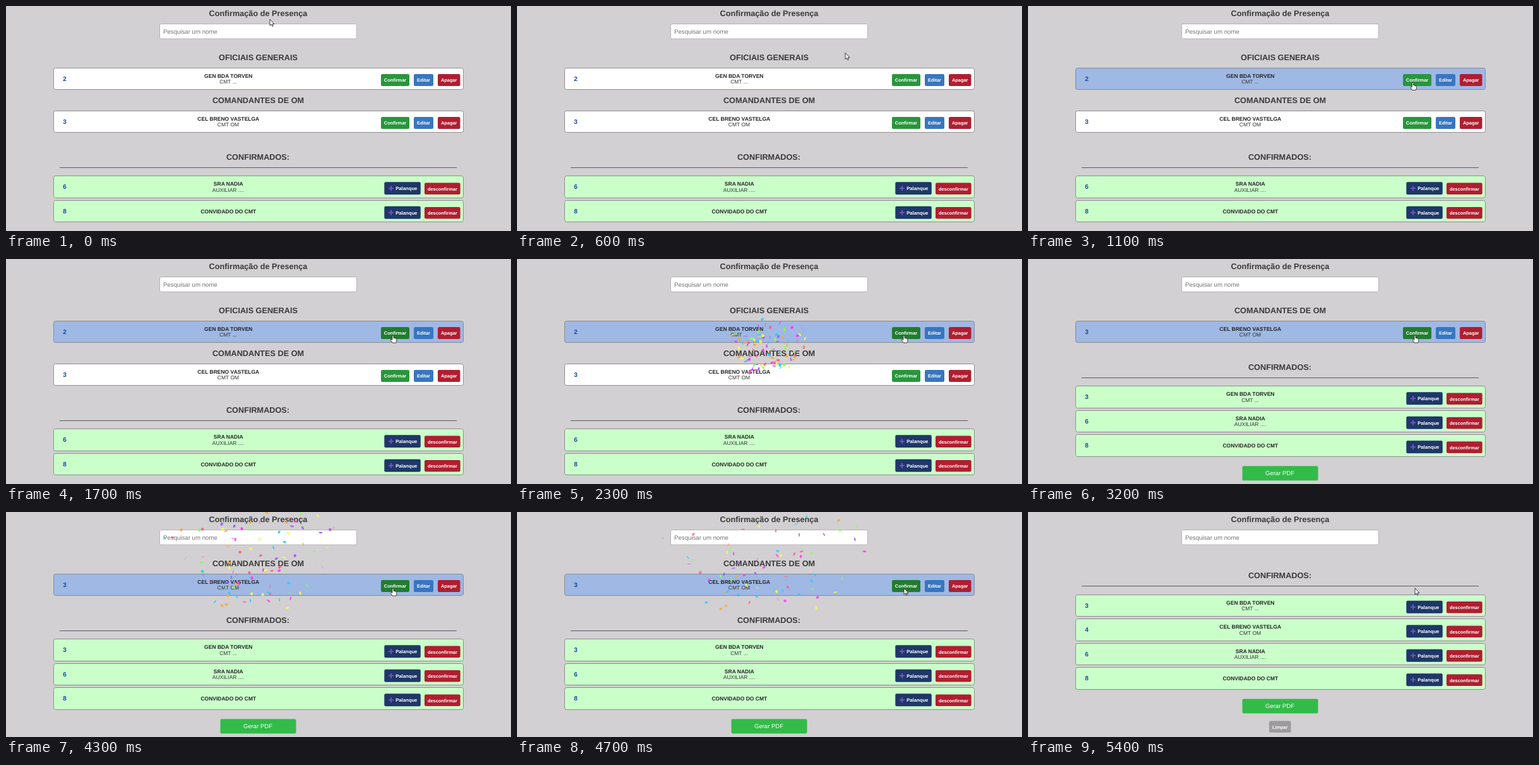
Write an HTML page with a canvas that moves like this. It is 800 px wide and 357 px high and loops after 5.5 s.

```html
<!DOCTYPE html>
<html lang="pt-BR">
<head>
<meta charset="utf-8">
<title>Confirmação de Presença</title>
<style>
  html, body { margin: 0; width: 100%; height: 100%; overflow: hidden; background: #d2d0d2; }
  svg, canvas { position: absolute; left: 0; top: 0; width: 800px; height: 357px; }
  text {
    font-family: "Liberation Sans", Arial, sans-serif;
    text-anchor: middle;
    text-rendering: geometricPrecision;
  }
</style>
</head>
<body>
<svg id="page" viewBox="0 0 800 357"></svg>
<canvas id="confetti" width="800" height="357"></canvas>
<svg viewBox="0 0 800 357">
  <g id="cursor" fill="#fff" stroke="#111" stroke-width=".8" stroke-linejoin="round">
    <path id="arrow" d="M0 0V10L2.3 8L3.8 11.3L5.4 10.6L3.9 7.5H7Z"/>
    <path id="hand" d="M-1.1 .8Q0 -.6 1.1 .8V4.4L4.3 5.1Q5.8 5.5 5.8 7V9Q5.8 10.5 4.8 12.2H-.8Q-2.4 10 -3.8 7.6Q-3.4 6 -1.1 7.4Z"/>
  </g>
</svg>
<script>
const LOOP = 5500;
const RELOADS = [2900, 4800];
const BURSTS = [{ start: 2240, end: 2900, seed: 11 }, { start: 4130, end: 4800, seed: 47 }];
const $ = id => document.getElementById(id);

const PEOPLE = {
  general: ['GEN BDA TORVEN', 'CMT ...'],
  colonel: ['CEL BRENO VASTELGA', 'CMT OM'],
  lady: ['SRA NADIA', 'AUXILIAR ....'],
  guest: ['CONVIDADO DO CMT', '']
};
const GREEN = [40, 150, 60], DARK_GREEN = [33, 124, 47];
const WHITE = [255, 255, 255], BLUE = [159, 184, 228];
const rgb = c => `rgb(${c.map(Math.round)})`;
const mix = (a, b, k) => rgb(a.map((v, i) => v + (b[i] - v) * k));
const clamp = v => Math.min(1, Math.max(0, v));
const snap = v => Math.floor(v) + .5;

// Static markup; y is the vertical middle of a line of text
const label = (s, x, y, size, fill, extra = '') =>
  `<text x="${x}" y="${y + size * .36}" font-size="${size}" fill="${fill}" ${extra}>${s}</text>`;
const bold = (s, x, y, size, fill) => label(s, x, y, size, fill, 'font-weight="700"');
const box = (x, y, w, h, fill, extra = '') =>
  `<rect x="${x}" y="${y}" width="${w}" height="${h}" rx="2.2" fill="${fill}" ${extra}/>`;
const button = (s, x, y, w, h, fill, extra) =>
  box(x, y, w, h, fill, extra) + bold(s, x + w / 2, y + h / 2 + .2, 7.42, '#fff');
const heading = (s, y) => bold(s, s.endsWith(':') ? 399 : 399.5, y, 12.7, '#3a3a3a');

function row(y, h, fill, num, [name, role], extra = '') {
  const top = snap(y);
  return `<rect x="75.5" y="${top}" width="649" height="${snap(y + h) - top}" rx="3" fill="${fill}" stroke="#858585" stroke-width=".9" ${extra}/>` +
    bold(num, 93, y + 17, 10, '#1648a0') +
    bold(name, 352.3, y + (role ? 12.7 : 17.5), 8.5, '#242424') +
    label(role, 352, y + 22.3, 8.5, '#333');
}

function pending(title, y, num, who, state) {
  const hover = state === 'hover', live = state === 'live';
  return heading(title, y) +
    row(y + 17, 34, rgb(hover ? BLUE : WHITE), num, who, live ? 'id="liveRow"' : '') +
    button('Confirmar', 594, y + 27, 45, 19, rgb(hover ? DARK_GREEN : GREEN), live ? 'id="liveButton"' : '') +
    button('Editar', 646, y + 27, 31, 19, '#3876bf') +
    button('Apagar', 684, y + 27, 35.5, 19, '#b01e30');
}

function confirmed(y, num, who) {
  return row(y, 34.9, '#caffca', num, who) +
    box(599.3, y + 9.7, 57.5, 20, '#1e3768') +
    `<path d="M606 ${y + 19.8}h8m-4 -4v8" stroke="#7550c4" stroke-width="2"/>` +
    bold('Palanque', 634.3, y + 20.2, 7.7, '#fff') +
    button('desconfirmar', 663, y + 11, 56.7, 18.5, '#b01e30');
}

function confirmedList(y, entries) {
  const top = y + 30.5, end = top + entries.length * 38.5;
  return heading('CONFIRMADOS:', y) +
    `<path d="M85 ${snap(y + 17)}H714" stroke="#5c5c5c"/>` +
    entries.map(([num, who], i) => confirmed(top + i * 38.5, num, who)).join('') +
    box(339.5, end + 11.5, 120, 23, '#33bb49') +
    label('Gerar PDF', 399, end + 22.7, 9.5, '#fff') +
    button('Limpar', 382, end + 46.5, 34.5, 18.5, '#9c9c9c');
}

const { general, colonel, lady, guest } = PEOPLE;
const rest = [[6, lady], [8, guest]];
const scenes = [
  pending('OFICIAIS GENERAIS', 81, 2, general, 'live') +
    pending('COMANDANTES DE OM', 149, 3, colonel) +
    confirmedList(239, rest),
  pending('COMANDANTES DE OM', 81, 3, colonel, 'hover') +
    confirmedList(171, [[3, general], ...rest]),
  confirmedList(100.5, [[3, general], [4, colonel], ...rest])
];

$('page').innerHTML =
  heading('Confirmação de Presença', 11.3) +
  box(243.5, 28.5, 312, 23.5, '#fff', 'stroke="#b4b4b4"') +
  label('Pesquisar um nome', 249, 40.2, 9.67, '#757575', 'style="text-anchor:start"') +
  scenes.map(s => `<g class="scene">${s}</g>`).join('');
const sceneNodes = document.querySelectorAll('.scene');

// Confetti: drag of 0.9 per tick plus a constant fall, in closed form
const ZOOM = .53, COUNT = 100, SPREAD = 80 * Math.PI / 180;
const COLORS = ['#26ccff', '#a25afd', '#ff5e7e', '#88ff5a', '#fcff42', '#ffa62d', '#ff36ff'];
const ctx = $('confetti').getContext('2d');

function random(seed) {
  return () => {
    seed = (seed + 0x6d2b79f5) | 0;
    let t = Math.imul(seed ^ (seed >>> 15), 1 | seed);
    t = (t + Math.imul(t ^ (t >>> 7), 61 | t)) ^ t;
    return ((t ^ (t >>> 14)) >>> 0) / 4294967296;
  };
}

for (const burst of BURSTS) {
  const rnd = random(burst.seed);
  burst.bits = Array.from({ length: COUNT }, (_, i) => ({
    angle: -Math.PI / 2 + (rnd() - .5) * SPREAD,
    speed: 45 * (.5 + rnd()),
    wobble: rnd() * 10,
    wobbleSpeed: Math.min(.11, rnd() * .1 + .05),
    tilt: (rnd() * .5 + .25) * Math.PI,
    size: rnd() + 2,
    round: rnd() < .5,
    color: COLORS[i % COLORS.length]
  }));
}

function drawBit(b, n) {
  const dist = b.speed * (1 - .9 ** n) / .1;
  const x = Math.cos(b.angle) * dist, y = Math.sin(b.angle) * dist + 3 * n;
  const wobble = b.wobble + b.wobbleSpeed * n, tilt = b.tilt + .1 * n;
  const wx = x + 10 * Math.cos(wobble), wy = y + 10 * Math.sin(wobble);
  const dx = b.size * Math.cos(tilt), dy = b.size * Math.sin(tilt);
  ctx.fillStyle = b.color;
  ctx.beginPath();
  if (b.round) {
    const rx = Math.abs(wx + dx - x - dx) * .6, ry = Math.abs(wy - y) * .6;
    ctx.ellipse(x, y, rx, ry, Math.PI / 10 * wobble, 0, 2 * Math.PI);
  } else {
    ctx.moveTo(x, y);
    ctx.lineTo(wx, y + dy);
    ctx.lineTo(wx + dx, wy + dy);
    ctx.lineTo(x + dx, wy);
  }
  ctx.fill();
}

function drawConfetti(t) {
  ctx.clearRect(0, 0, 800, 357);
  const burst = BURSTS.find(b => t >= b.start && t < b.end);
  if (!burst) return;
  const n = (t - burst.start) * .06;
  ctx.save();
  ctx.translate(397, 205);
  ctx.scale(ZOOM, ZOOM);
  ctx.globalAlpha = 1 - n / 200;
  burst.bits.forEach(b => drawBit(b, n));
  ctx.restore();
}

// Pointer path: time, x, y
const PATH = [[100, 418, 21], [1080, 609.5, 121.3], [1250, 609.5, 121.3], [1600, 613, 120.8]];
const ease = u => u < .5 ? 4 * u ** 3 : 1 - (2 - 2 * u) ** 3 / 2;

function pointerAt(t) {
  const i = PATH.findIndex(p => t < p[0]);
  if (i <= 0) return PATH[i ? PATH.length - 1 : 0].slice(1);
  const [t0, x0, y0] = PATH[i - 1], [t1, x1, y1] = PATH[i];
  const k = ease((t - t0) / (t1 - t0));
  return [x0 + (x1 - x0) * k, y0 + (y1 - y0) * k];
}

function render(t) {
  const scene = RELOADS.filter(r => t >= r).length;
  sceneNodes.forEach((g, i) => g.style.display = i === scene ? '' : 'none');
  $('liveRow').setAttribute('fill', mix(WHITE, BLUE, clamp((t - 780) / 200)));
  $('liveButton').setAttribute('fill', mix(GREEN, DARK_GREEN, clamp((t - 1100) / 250)));

  const [x, y] = pointerAt(t);
  const busy = (t >= 2500 && t < RELOADS[0]) || t >= 4500;
  const hand = x > 594 && y > 108 && !busy;
  $('cursor').setAttribute('transform', `translate(${x} ${y})`);
  $('hand').style.display = hand ? '' : 'none';
  $('arrow').style.display = hand ? 'none' : '';
  drawConfetti(t);
}

const begin = performance.now();
function tick() {
  render((performance.now() - begin) % LOOP);
  requestAnimationFrame(tick);
}
tick();
</script>
</body>
</html>
```
